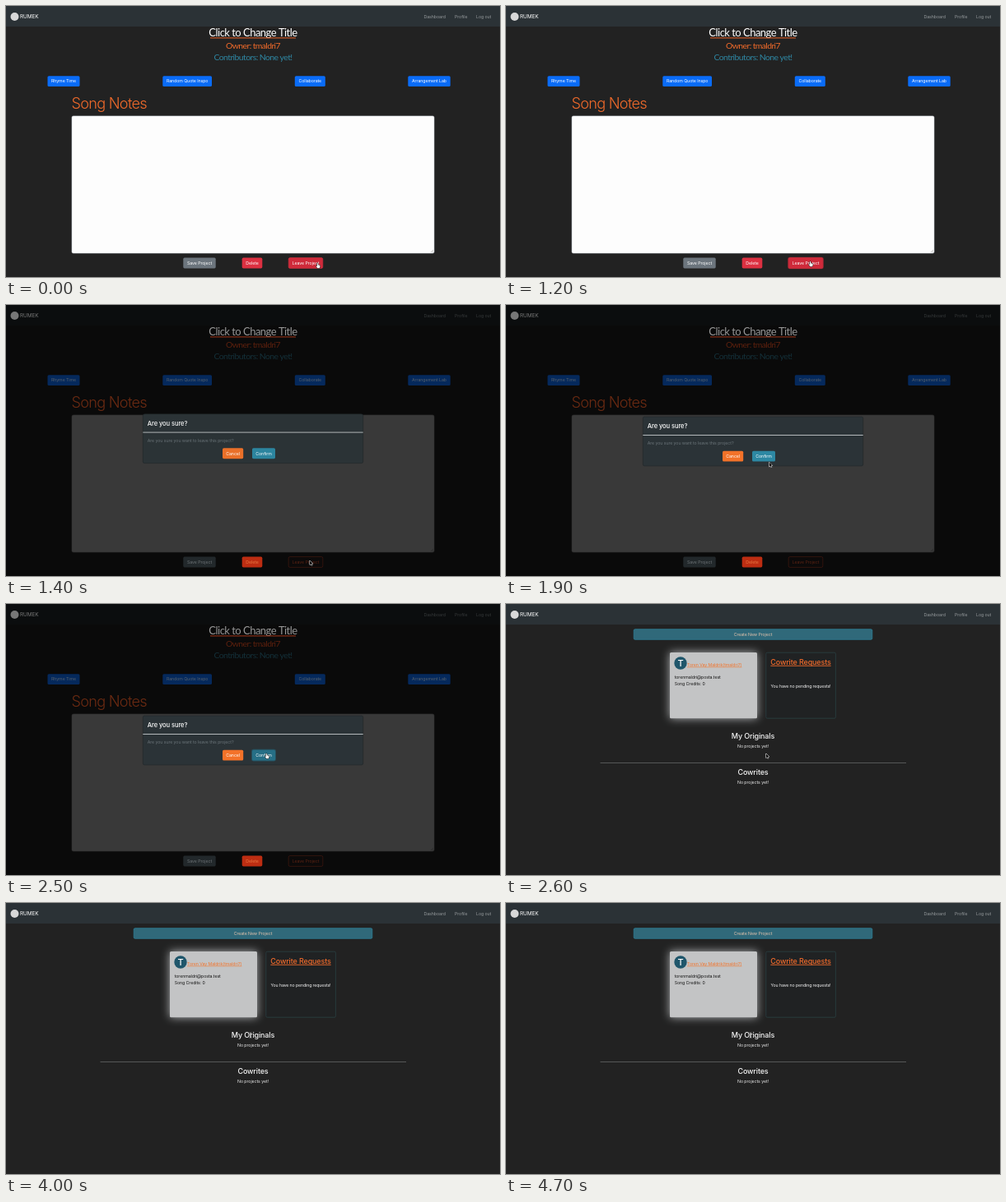
An HTML page with a canvas that plays this animation: 600x330 px, repeating every 4800 ms.

```html
<!DOCTYPE html>
<html lang="en">
<head>
<meta charset="utf-8">
<title>Song project</title>
<style>
html, body { margin: 0; width: 100%; height: 100%; overflow: hidden; background: #222; }
canvas { display: block; width: 600px; height: 330px; }
</style>
</head>
<body>
<canvas id="stage" width="600" height="330"></canvas>
<script>
const ctx = document.getElementById('stage').getContext('2d');
const LOOP = 4800, STEP = 100;
const SANS = 'Inter, "Liberation Sans", sans-serif';
const NARROW = 'Lato, "Open Sans", sans-serif';
const APP = 'RUMEK', USER = 'tmaldri7', FULL_NAME = 'Toren Vay Maldrik', MAIL = 'torenmaldri@posta.test';

const clamp = x => Math.max(0, Math.min(1, x));
const lerp = (a, b, k) => a + (b - a) * k;
const progress = (t, from, to) => clamp((t - from) / (to - from));
const smooth = k => k * k * (3 - 2 * k);

let dim = 0;

// Blends a normal colour towards its look behind the backdrop.
function shade(lit, dark) {
  const channel = (hex, i) => parseInt(hex.substr(1 + 2 * i, 2), 16);
  return 'rgb(' + [0, 1, 2].map(i => Math.round(lerp(channel(lit, i), channel(dark, i), dim))) + ')';
}

function box(x, y, w, h, r, fill, stroke, line = 1) {
  ctx.beginPath();
  ctx.roundRect(x, y, w, h, r);
  if (fill) { ctx.fillStyle = fill; ctx.fill(); }
  if (stroke) { ctx.strokeStyle = stroke; ctx.lineWidth = line; ctx.stroke(); }
}

function disc(x, y, r, fill) {
  ctx.beginPath();
  ctx.arc(x, y, r, 0, Math.PI * 2);
  ctx.fillStyle = fill;
  ctx.fill();
}

// y is the middle of the capital letters.
function text(str, x, y, color, { size = 5.25, weight = 400, align = 'left', family = SANS, gap = -0.08, underline = 0 } = {}) {
  ctx.font = `${weight} ${size}px ${family}`;
  ctx.letterSpacing = gap + 'px';
  ctx.textAlign = align;
  ctx.fillStyle = color;
  ctx.fillText(str, x, y + size * 0.36);
  if (underline) {
    const w = ctx.measureText(str).width;
    ctx.fillRect(align === 'center' ? x - w / 2 : x, y + size * 0.5, w, underline);
  }
}

function button(label, x, y, w, fill, color = '#ffffff', stroke = null, line = 0.6) {
  box(x, y, w, 12.8, 1.6, fill, stroke, line);
  text(label, x + w / 2, y + 6.4, color, { align: 'center' });
}

function navbar() {
  ctx.fillStyle = shade('#222222', '#0a0a0a');
  ctx.fillRect(0, 0, 600, 330);
  ctx.fillStyle = shade('#2b3236', '#0b0d0e');
  ctx.fillRect(0, 0, 600, 25);
  disc(10.5, 13, 5, shade('#d8d8d8', '#777777'));
  text(APP, 17, 13, shade('#ffffff', '#777777'), { size: 6.4 });
  const link = shade('#959a9c', '#36393a');
  text('Dashboard', 507.5, 13, link);
  text('Profile', 545, 13, link);
  text('Log out', 571, 13, link);
}

function projectPage(t) {
  navbar();
  const heading = { align: 'center', family: NARROW };
  text('Click to Change Title', 300, 32.7, shade('#ffffff', '#969696'), { ...heading, size: 13, gap: -0.52 });
  ctx.fillStyle = shade('#ef6428', '#a33518');
  ctx.fillRect(248, 38.4, 104, 1);
  text('Owner: ' + USER, 300, 48.5, shade('#f06a2a', '#5c200e'), { ...heading, size: 10.4, gap: -0.6 });
  text('Contributors: None yet!', 300, 62.7, shade('#2f87a3', '#143039'), { ...heading, size: 10.4, gap: -0.56 });

  const blue = shade('#0a6cf8', '#05295c'), label = shade('#ffffff', '#55606c');
  button('Rhyme Time', 50.5, 85.2, 39, blue, label);
  button('Random Quote Inspo', 190.3, 85.2, 59.7, blue, label);
  button('Collaborate', 350.8, 85.2, 37, blue, label);
  button('Arrangement Lab', 488.3, 85.2, 51.4, blue, label);

  text('Song Notes', 79.5, 118, shade('#f06a2a', '#6b2a12'), { size: 18.2, weight: 300, gap: -0.75 });
  box(80, 134, 440, 167, 1.8, shade('#fdfdfd', '#393939'), shade('#ced4da', '#303030'), 0.6);
  ctx.strokeStyle = shade('#888888', '#202020');
  ctx.lineWidth = 0.5;
  ctx.beginPath();
  ctx.moveTo(516, 300); ctx.lineTo(519, 297);
  ctx.moveTo(518, 300); ctx.lineTo(519, 299);
  ctx.stroke();

  button('Save Project', 215.3, 306.6, 39.4, shade('#6c757d', '#22282b'), shade('#ffffff', '#6c7275'));
  button('Delete', 286.7, 306.6, 24.6, shade('#dc3041', '#bd2d12'), shade('#ffffff', '#e87842'));
  if (t >= 900 && dim < 0.5) box(342.2, 305.7, 43.6, 14.6, 2.4, '#85242e');
  button('Leave Project', 343.2, 306.6, 41.6, shade('#cf2a3a', '#0c0a0a'), shade('#ffffff', '#5a2213'), shade('#d23040', '#4c1b10'));
}

function modal(t, k) {
  ctx.save();
  ctx.globalAlpha = Math.min(1, k * 1.6);
  ctx.translate(0, -21 * (1 - k) * (1 - k));
  box(166.3, 136, 267.4, 60, 2, '#2b3337', '#1c2225', 0.5);
  text('Are you sure?', 171.7, 147.2, '#ffffff', { size: 7.6, weight: 500, gap: -0.1 });
  ctx.fillStyle = '#c4c9cb';
  ctx.fillRect(166.3, 158, 267.4, 0.9);
  text('Are you sure you want to leave this project?', 171.7, 168.3, '#6a7479');
  button('Cancel', 263, 177.7, 25.2, '#f37229');
  const hover = t >= 2000;
  if (t >= 2300) box(298, 176.8, 30, 14.6, 2.4, '#27505e');
  button('Confirm', 299, 177.7, 28, hover ? '#266f86' : '#2d88a3');
  ctx.restore();
}

function dashboard() {
  navbar();
  box(155.2, 30.7, 289.6, 12.6, 1.5, '#30697a', '#2d849d', 0.7);
  text('Create New Project', 300, 37, '#e3c3ad', { align: 'center' });

  ctx.save();
  ctx.shadowColor = 'rgba(225,230,232,.75)';
  ctx.shadowBlur = 11;
  box(199, 59, 106, 80.3, 1.5, '#c3c4c5');
  ctx.restore();
  disc(212, 72, 7.7, '#1f566b');
  text('T', 212, 72, '#ffffff', { size: 11, weight: 500, align: 'center' });
  text(`${FULL_NAME}(${USER})`, 220, 74, '#f2752e', { underline: 0.6 });
  text(MAIL, 204.7, 89, '#161616');
  text('Song Credits: 0', 204.7, 97, '#161616');

  box(315.8, 59.2, 84.6, 80, 1.5, '#202223', '#2c4648', 0.7);
  const title = { size: 9, weight: 500, align: 'center', gap: -0.15 };
  text('Cowrite Requests', 358, 70.3, '#ee6a2b', { ...title, underline: 0.9 });
  text('You have no pending requests!', 358, 100, '#f4f4f4', { align: 'center', gap: -0.13 });

  text('My Originals', 300, 161.2, '#f4f4f4', title);
  text('No projects yet!', 300, 173.4, '#e9e9e9', { align: 'center' });
  ctx.fillStyle = '#626464';
  ctx.fillRect(114.5, 193, 371.5, 0.8);
  text('Cowrites', 300, 204.8, '#f4f4f4', title);
  text('No projects yet!', 300, 216.8, '#e9e9e9', { align: 'center' });
}

function outline(points, x, y) {
  ctx.beginPath();
  points.forEach(([dx, dy]) => ctx.lineTo(x + dx, y + dy));
  ctx.closePath();
  ctx.lineJoin = 'round';
}

const ARROW = [[0, 0], [0, 5.4], [1.3, 4.3], [2.1, 6.1], [3, 5.7], [2.2, 4], [3.8, 3.9]];
const HAND = [[0, 0], [0.9, 0], [1.1, 2.2], [3.6, 2.8], [3.6, 4.8], [2.9, 6.2], [0.5, 6.2], [-1.3, 3.8], [-0.8, 3.3], [0.2, 3.9]];

function cursor(kind, x, y) {
  if (kind === 'text') {
    ctx.strokeStyle = '#d8d8d8';
    ctx.lineWidth = 0.7;
    ctx.beginPath();
    ctx.moveTo(x - 1.3, y - 3.2); ctx.lineTo(x, y - 2.6); ctx.lineTo(x + 1.3, y - 3.2);
    ctx.moveTo(x, y - 2.6); ctx.lineTo(x, y + 2.6);
    ctx.moveTo(x - 1.3, y + 3.2); ctx.lineTo(x, y + 2.6); ctx.lineTo(x + 1.3, y + 3.2);
    ctx.stroke();
    return;
  }
  const hand = kind === 'hand';
  outline(hand ? HAND : ARROW, x, y);
  ctx.strokeStyle = hand ? '#111111' : '#f0f0f0';
  ctx.lineWidth = 1;
  ctx.stroke();
  ctx.fillStyle = hand ? '#ffffff' : '#111111';
  ctx.fill();
}

// Start time, end time, then the point reached.
const MOVES = [[0, 600, 369, 311], [1400, 2000, 315.8, 182], [2600, 3200, 297, 161]];

function pointer(t) {
  let x = 377.8, y = 313;
  for (const [from, to, nx, ny] of MOVES) {
    const k = smooth(progress(t, from, to));
    x = lerp(x, nx, k);
    y = lerp(y, ny, k);
  }
  return [x, y];
}

function draw(t) {
  const onProject = t < 2600;
  dim = onProject ? progress(t, 1220, 1370) : 0;
  const [x, y] = pointer(t);
  let kind = 'arrow';
  if (onProject) {
    projectPage(t);
    const open = progress(t, 1220, 1520);
    if (open) modal(t, open);
    if (!open || t >= 2000) kind = 'hand';
  } else {
    dashboard();
    if (y < 167) kind = 'text';
  }
  cursor(kind, x, y);
}

const start = performance.now();
function tick() {
  const t = (performance.now() - start) % LOOP;
  draw(Math.floor(t / STEP) * STEP);
  requestAnimationFrame(tick);
}
tick();
</script>
</body>
</html>
```
